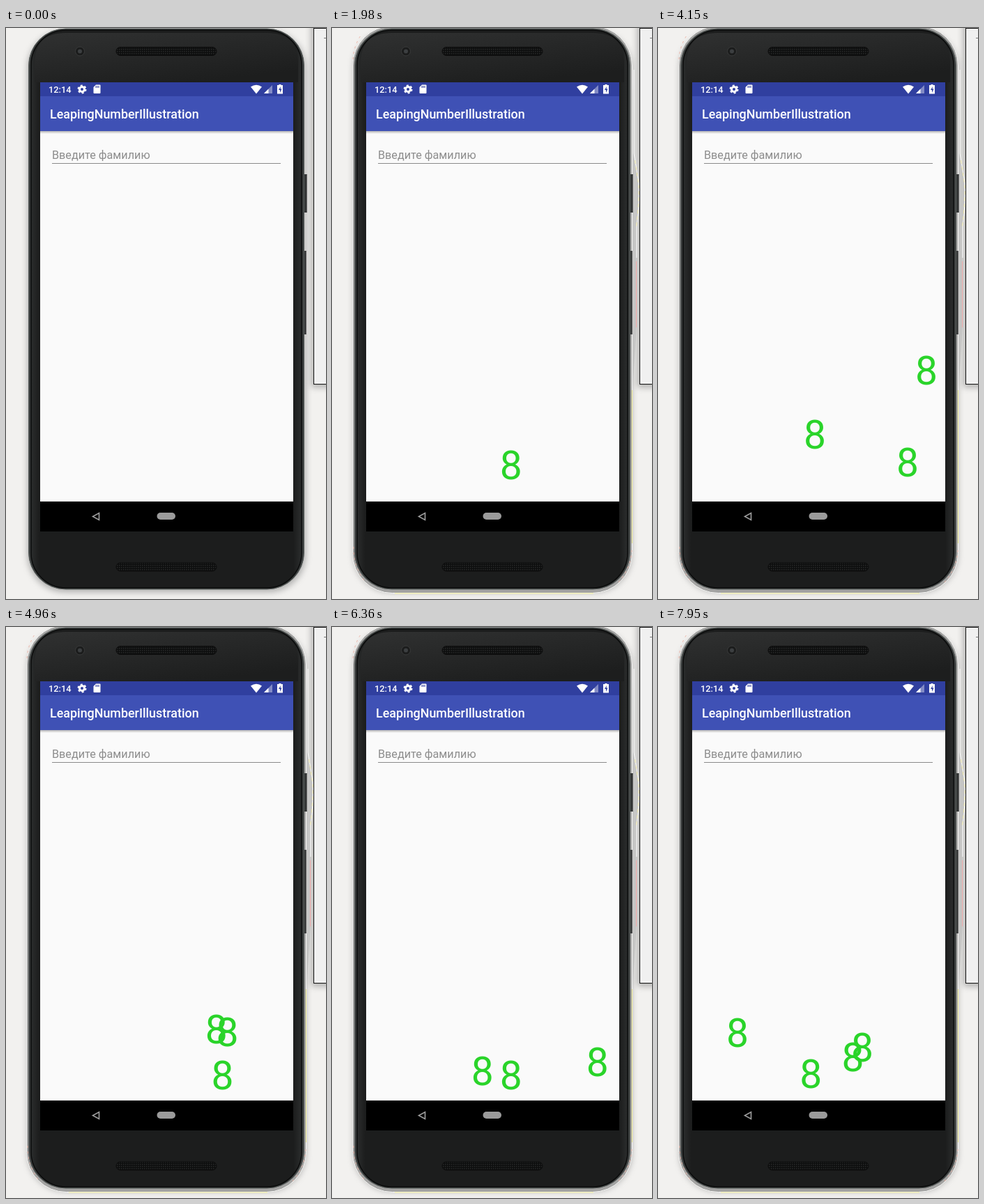
An HTML page for the animation above (8000 ms loop, 459 by 820 pixels).

```html
<!DOCTYPE html>
<html lang="ru">
<head>
<meta charset="utf-8">
<title>Bouncing digits</title>
<style>
  html, body { margin: 0; width: 100%; height: 100%; overflow: hidden; background: #f2f1ef; }
  svg { display: block; width: 459px; height: 820px; }
  text { font-family: Roboto, "Noto Sans", sans-serif; }
  .soft { filter: blur(5px); }
  .ball { font-size: 57px; fill: #2ad42a; text-anchor: middle; visibility: hidden; }
  #halo { visibility: hidden; }
</style>
</head>
<body>
<svg viewBox="0 0 459 820">
  <defs>
    <linearGradient id="shell" x2="1">
      <stop offset="0" stop-color="#2b2d2d"/>
      <stop offset=".03" stop-color="#1c1d1d"/>
      <stop offset=".97" stop-color="#1c1d1d"/>
      <stop offset="1" stop-color="#2b2d2d"/>
    </linearGradient>
    <linearGradient id="gloss" x2=".6" y2="1">
      <stop offset="0" stop-color="#303131"/>
      <stop offset="1" stop-color="#1d1e1e"/>
    </linearGradient>
    <linearGradient id="drop" x2="0" y2="1">
      <stop offset="0" stop-color="#000" stop-opacity=".28"/>
      <stop offset="1" stop-color="#000" stop-opacity="0"/>
    </linearGradient>
    <pattern id="mesh" width="3" height="3" patternUnits="userSpaceOnUse">
      <rect width="3" height="3" fill="#0d0e0e"/>
      <rect width="1.5" height="1.5" fill="#292a2a"/>
    </pattern>
  </defs>

  <rect width="459" height="820" fill="#f2f1ef"/>
  <rect class="soft" x="31" y="4" width="399" height="806" rx="54" fill="#777" opacity=".55"/>
  <rect class="soft" x="438" y="-9" width="40" height="525" fill="#777" opacity=".55"/>

  <g id="halo" fill="none">
    <path d="M426 30Q433 60 433 180L440 222Q442 245 437 285V430L431 520V750L420 700Z" fill="#c6c6c5"/>
    <path d="M433 60V180L440 222Q442 245 437 285V330" stroke="#fff"/>
    <rect x="29.5" y="-3" width="401" height="814.5" rx="57" fill="#a3a3a2" stroke="#f8f8f6"/>
    <path d="M434.5 190L440 226Q441 245 436.500 285" stroke="#f3eba8" stroke-dasharray="5 4"/>
    <path d="M436.500 335V430" stroke="#eda5a5"/>
    <path d="M430.500 520V740M90 812H375" stroke="#f4f29a"/>
    <path d="M31 745Q31 775 48 796M411 796Q429 775 430 750M30 45Q31 25 43 8" stroke="#efb6a8" stroke-dasharray="3 5"/>
  </g>

  <!-- side keys and body -->
  <rect x="426" y="210" width="6" height="55" rx="1" fill="#333535"/>
  <rect x="426" y="320" width="5" height="120" rx="1" fill="#333535"/>
  <path d="M431.500 211V264M430.500 321V439" stroke="#666"/>
  <rect x="32.500" y="1" width="395" height="805" rx="53" fill="#3b3e3e" stroke="#595e5c"/>
  <rect x="36" y="3" width="388" height="801" rx="50" fill="url(#shell)" stroke="#0a0b0b" stroke-width="1.500"/>
  <path d="M41 78V50Q41 7 86 7H374Q419 7 419 50V78Z" fill="url(#gloss)"/>
  <circle cx="106" cy="33.500" r="6.500" fill="#1b1c1c" stroke="#3a3b3b"/>
  <circle cx="106" cy="33.500" r="3" fill="#3c3f41"/>
  <g fill="url(#mesh)" stroke="#0c0c0c">
    <rect x="158" y="27.500" width="144" height="12" rx="6"/>
    <rect x="158" y="768" width="144" height="12" rx="6"/>
  </g>

  <!-- screen -->
  <rect x="49" y="78" width="363" height="645"/>
  <rect x="49" y="98" width="363" height="582" fill="#fafafa"/>
  <rect x="49" y="78" width="363" height="21" fill="#303f9f"/>
  <rect x="49" y="98" width="363" height="50" fill="#3f51b5"/>
  <rect x="49" y="148" width="363" height="4" fill="url(#drop)"/>

  <g fill="#fff">
    <text x="61" y="93" font-size="12.800" font-weight="500">12:14</text>
    <text x="63" y="130" font-size="17.900" font-weight="500">LeapingNumberIllustration</text>
    <circle cx="109" cy="88" r="3.500" fill="none" stroke="#fff" stroke-width="3"/>
    <circle cx="109" cy="88" r="5.500" fill="none" stroke="#fff" stroke-width="2" stroke-dasharray="2.900 2.860"/>
    <path d="M129 81.500H134.500Q135.500 81.500 135.500 82.500V93Q135.500 94 134.500 94H126.500Q125.500 94 125.500 93V85Z"/>
    <path d="M351 84.500Q359 79 367 84.500L359 94.500Z"/>
    <path d="M382 82V94H370Z" opacity=".4"/>
    <path d="M376.500 87.500V94H370Z"/>
    <path d="M391.500 82V81H394.500V82H397V94.500H389V82Z"/>
  </g>
  <path d="M129 83V86M131 83V86M133 83V86" stroke="#303f9f"/>
  <path d="M394 84L391 89H393V93L395.500 87.500H393.500Z" fill="#303f9f"/>

  <text x="66" y="188" font-size="16.200" fill="#8d8d8d">Введите фамилию</text>
  <path d="M66 194.500H394" stroke="#8a8a8a"/>
  <path d="M133.500 696.500V706.500L124.500 701.500Z" fill="none" stroke="#a0a0a0" stroke-width="1.600"/>
  <rect x="216.500" y="696" width="26.500" height="10" rx="5" fill="#9b9b9b"/>

  <g id="balls"></g>

  <!-- neighbouring window -->
  <rect x="441.500" y=".5" width="30" height="511" fill="#f0f0f0" stroke="#111"/>
  <path d="M456 14.500H459" stroke="#777"/>
</svg>

<script>
const LOOP = 8000, START = 500, STEP = 57.31, PHASE = 0.35;
const GRAVITY = 5.45e-4; // px per ms²
const FLOOR = 645;

// Contacts of each ball: [time, x, y = FLOOR, gravity until the next contact]
const paths = [
  [[905, 148, 427], [1260, 188.5, 420], [2025, 260], [3590, 394.5], [4305, 349.2],
   [4960, 311], [5500, 286.5], [5960, 269.5], [6355, 256.5], [6725, 245.5],
   [7055, 236.5], [7350, 229.6], [7610, 224.5], [7840, 221], [8050, 217.8]],
  [[2150, 210, 421], [3057, 309], [4026, 397.5, 483], [4755, 333.5, FLOOR, 4.33e-4],
   [6322, 217.3], [7500, 142.5], [8460, 81.5]],
  [[3758, 186, 538], [4384, 245.5], [5390, 342], [6055, 396.5, 611], [6474, 373.7],
   [7150, 328.6], [7775, 290], [8525, 245]],
  [[6774, 163.5, 320], [7866, 284], [9736, 484]]
];

const halo = document.getElementById("halo");
const layer = document.getElementById("balls");
const balls = paths.map(() => {
  const node = document.createElementNS("http://www.w3.org/2000/svg", "text");
  node.setAttribute("class", "ball");
  node.textContent = "8";
  return layer.appendChild(node);
});

// Free flight between two contacts
function locate(path, t) {
  const i = path.findIndex(p => p[0] > t);
  if (i < 1) return null;
  const [t0, x0, y0 = FLOOR, g = GRAVITY] = path[i - 1];
  const [t1, x1, y1 = FLOOR] = path[i];
  const s = (t - t0) / (t1 - t0);
  return {
    x: x0 + (x1 - x0) * s,
    y: y0 + (y1 - y0) * s - g / 2 * (t - t0) * (t1 - t)
  };
}

function draw(t) {
  const running = t >= START;
  const step = Math.floor((t - START) / STEP + PHASE);
  const time = running ? START + step * STEP : 0;
  halo.style.visibility = running ? "visible" : "hidden";
  balls.forEach((node, i) => {
    const pos = locate(paths[i], time);
    node.style.visibility = pos ? "visible" : "hidden";
    if (!pos) return;
    node.setAttribute("x", pos.x.toFixed(1));
    node.setAttribute("y", (pos.y + 20.3).toFixed(1));
  });
}

const begin = performance.now();
function tick() {
  draw((performance.now() - begin) % LOOP);
  requestAnimationFrame(tick);
}
tick();
</script>
</body>
</html>
```
